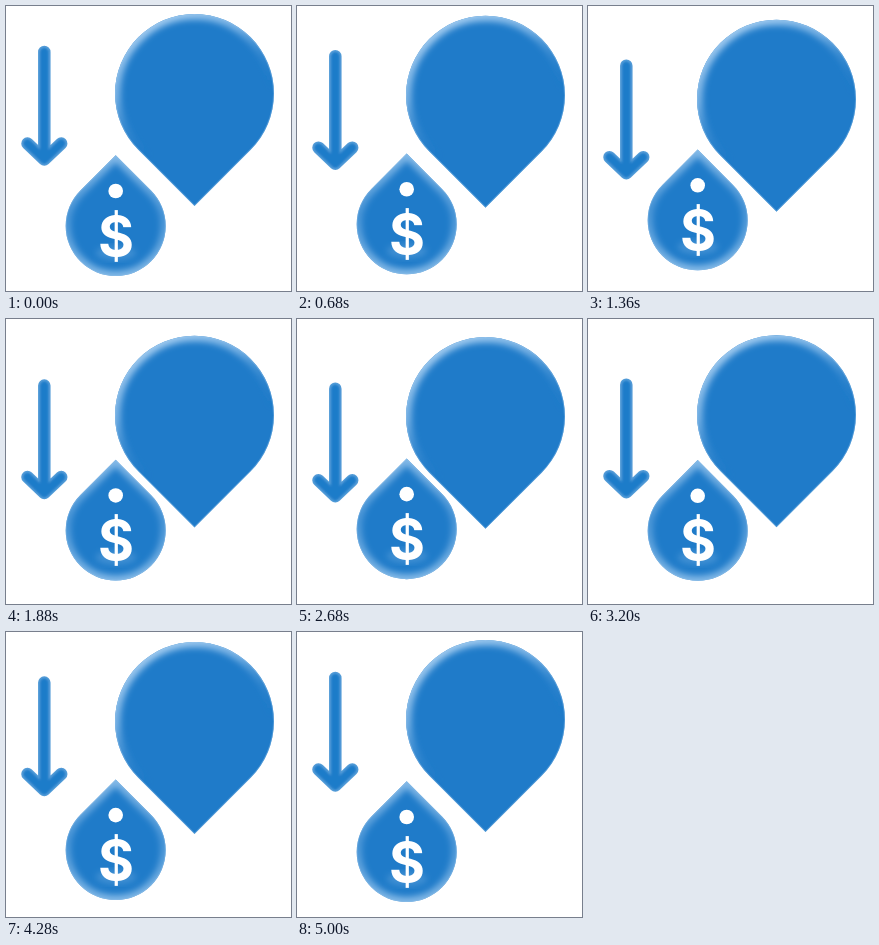
Write an HTML page that moves like this. It is 285x285 px and loops after 5040 ms.

```html
<!DOCTYPE html>
<html lang="en">
<head>
<meta charset="utf-8">
<style>
html, body { margin: 0; width: 100%; height: 100%; overflow: hidden; background: #fff; }
svg { display: block; width: 100vw; height: 100vh; }
text { font: 700 55px Inter, sans-serif; text-anchor: middle; fill: #fff; }
</style>
</head>
<body>
<svg viewBox="0 0 285 285">
  <defs>
    <filter id="soft" x="-20%" y="-20%" width="140%" height="140%"><feGaussianBlur stdDeviation="3"/></filter>
    <filter id="fine" x="-20%" y="-20%" width="140%" height="140%"><feGaussianBlur stdDeviation="1.2"/></filter>
    <linearGradient id="shine" x1="0.25" y1="0" x2="0.6" y2="0.75">
      <stop offset="0" stop-color="#a9d0f2"/>
      <stop offset="0.35" stop-color="#8fc0ec" stop-opacity="0.8"/>
      <stop offset="0.8" stop-color="#1f7bc9" stop-opacity="0"/>
    </linearGradient>
    <linearGradient id="rim" x1="0" y1="0" x2="0" y2="1">
      <stop offset="0" stop-color="#a9d0f2" stop-opacity="0.75"/>
      <stop offset="0.5" stop-color="#8fc0ec" stop-opacity="0.4"/>
      <stop offset="1" stop-color="#a9d0f2" stop-opacity="0.75"/>
    </linearGradient>
    <path id="bigShape" d="M188.5 200 L132.3 143.8 A79.5 79.5 0 1 1 244.7 143.8 Z"/>
    <path id="smallShape" d="M109.7 149.3 L145 184.6 A50 50 0 1 1 74.4 184.6 Z"/>
    <path id="arrowShape" d="M38.3 46 V153 M21.5 137.5 L38.3 153.5 L55.2 137.5"/>
    <clipPath id="bigClip"><use href="#bigShape"/></clipPath>
    <clipPath id="smallClip"><use href="#smallShape"/></clipPath>
  </defs>
  <g id="big">
    <use href="#bigShape" fill="#1f7bc9"/>
    <g clip-path="url(#bigClip)" fill="none">
      <use href="#bigShape" stroke="url(#shine)" stroke-width="11" filter="url(#soft)"/>
      <use href="#bigShape" stroke="#9cc6ea" stroke-opacity="0.35" stroke-width="2"/>
    </g>
  </g>
  <g id="small">
    <use href="#smallShape" fill="#1f7bc9"/>
    <g clip-path="url(#smallClip)" fill="none">
      <use href="#smallShape" stroke="url(#rim)" stroke-width="10" filter="url(#soft)"/>
      <use href="#smallShape" stroke="#9cc6ea" stroke-opacity="0.3" stroke-width="2"/>
      <ellipse cx="110" cy="247" rx="20" ry="7" fill="#8fc0ec" fill-opacity="0.3" filter="url(#soft)"/>
    </g>
    <circle cx="109.7" cy="185" r="7.3" fill="#fff"/>
    <text x="110" y="249.5">$</text>
  </g>
  <g id="arrow" fill="none" stroke-linecap="round" stroke-linejoin="round">
    <use href="#arrowShape" stroke="#5b9fd9" stroke-width="12.5"/>
    <use href="#arrowShape" stroke="#1f7bc9" stroke-width="8.5" filter="url(#fine)"/>
  </g>
</svg>
<script>
const LOOP = 5040, SWING = 5000;
const parts = [["big", 10], ["small", -10], ["arrow", 24]]
  .map(([id, travel]) => [document.getElementById(id), travel]);

function draw(now) {
  const t = now % LOOP;
  const k = (1 - Math.cos(2 * Math.PI * Math.min(t, SWING) / SWING)) / 2;
  for (const [el, travel] of parts) {
    el.setAttribute("transform", `translate(0 ${(travel * k).toFixed(2)})`);
  }
}

const start = performance.now();
function tick() {
  draw(performance.now() - start);
  requestAnimationFrame(tick);
}
tick();
</script>
</body>
</html>
```
